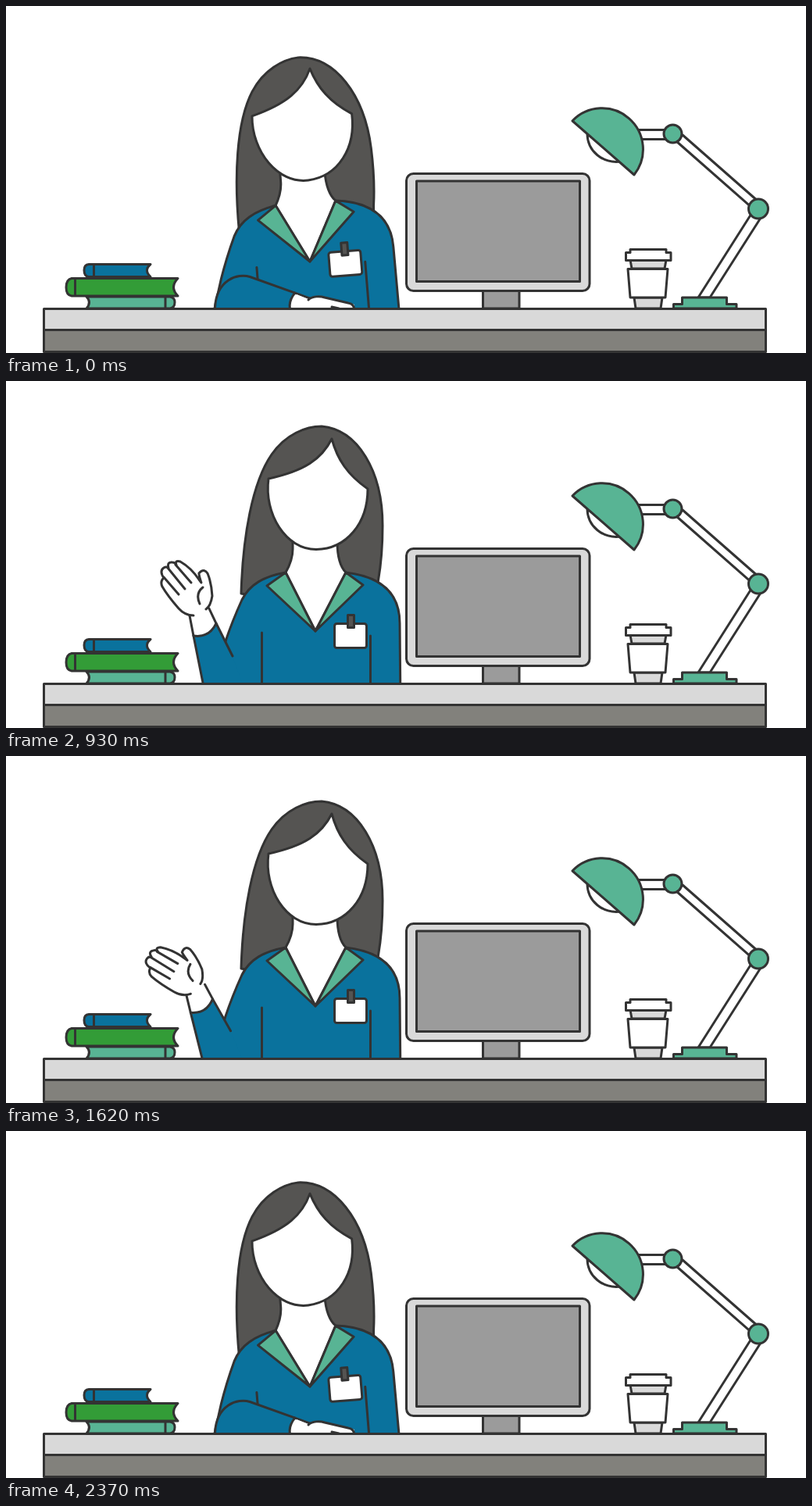
Write an HTML page that moves like this. It is 1024x444 px and loops after 3000 ms.

```html
<!DOCTYPE html>
<html lang="en">
<head>
<meta charset="utf-8">
<title>Reception desk</title>
<style>
  html, body { margin: 0; width: 100%; height: 100%; overflow: hidden; background: #fff; }
  svg { display: block; width: 100%; height: 100%; }
  g { stroke: #333; stroke-width: 3; stroke-linejoin: round; stroke-linecap: round; fill: none; }
  .white { fill: #fff; }
  .light { fill: #d9d9d9; }
  .gray { fill: #9b9b9b; }
  .dark { fill: #82817c; }
  .hair { fill: #555452; }
  .blue { fill: #0a729d; }
  .green { fill: #339c37; }
  .teal { fill: #58b494; }
  .bare { stroke: none; }
</style>
</head>
<body>
<svg viewBox="0 0 1024 444">
  <g id="hairBack">
    <path class="hair" d="M301,272 C303,200 315,130 340,94 C358,68 384,58 404,58 C450,62 482,115 482,185 Q482,225 476,258 L474,275 L400,290 Z"/>
  </g>

  <g id="torso">
    <path class="white bare" d="M367,200 V215 C367,228 362,238 358,245 L396,320 L435,245 C428,238 424,225 424,200 Z"/>
    <path d="M367,205 V215 C367,228 362,238 358,245 M424,205 C424,225 428,238 435,245"/>
    <path class="blue" d="M358,245 C330,250 312,260 302,280 C292,302 286,318 281,333 L254,420 H505 L504,310 C504,270 478,250 435,245 L396,320 Z"/>
    <path class="teal" d="M358,245 L334,262 L396,320 Z M435,245 L457,261 L396,320 Z"/>
    <path d="M327.5,322 V400 M466.5,326 V400"/>
    <rect class="white" x="420.5" y="310.5" width="41" height="31" rx="3"/>
    <rect class="hair" x="437.5" y="299.5" width="8" height="16"/>
  </g>

  <g id="face">
    <path class="white" d="M336,125 C330,170 358,215.5 397,215.5 C436,215 463,182 463,138 C437,120 424,100 417,74 C404,100 382,115 336,125 Z"/>
  </g>

  <g id="forearm">
    <path class="white bare" d="M240,326 L235,300 L259,291 L269,310 L262,332 Z"/>
    <path d="M240,326 L235,300 M269,310 L260,291"/>
    <path class="blue bare" d="M240,326 L252,386 C256,402 277,421 309,404 L290,352 L269,310 Q260,329 240,326 Z"/>
    <path d="M309,404 C277,421 256,402 252,386 L240,326 Q260,329 269,310 L290,352"/>
    <g id="openHand">
      <path class="white" d="M240,300 Q229,300 221,291 Q207,275 200,263 Q197,256 202,252 Q196,243 202,239 Q205,237 208,239 Q206,231 213,232 Q216,232 218,235 Q216,229 223,231 Q237,239 247,254 L250,258 Q247,249 247,246 Q253,239 258,246 Q263,258 264,275 Q262,288 256,292"/>
      <path d="M202,251 L221,273 M207,239 L229,266 M217,235 L237,258 M252,264 Q242,272 248,285"/>
    </g>
  </g>

  <g id="restHand">
    <path class="white bare" d="M372,369 L387,375 L408,373 L446,382 V394 H364 Z"/>
    <path class="white" d="M387,376 C392,371 402,371 408,373 L438,380 Q446,381 446,390"/>
    <path d="M417,385 L426,387"/>
  </g>

  <g id="desk">
    <rect class="light" x="48.5" y="387.5" width="924" height="27"/>
    <rect class="dark" x="48.5" y="414.5" width="924" height="28"/>
  </g>

  <g id="books">
    <path class="blue" d="M185,330.5 H106 Q100,331 100,338 Q100,346 106,346.5 H185 Q176,338 185,330.5 Z M112.5,331 V346"/>
    <path class="green" d="M220,348.5 H84 Q77,350 77,360 Q77,370 84,371 H220 Q209,360 220,348.5 Z M88.5,349 V371"/>
    <path class="teal" d="M103,372 H210 Q216,373 216,379 Q216,386 210,387 H103 Q110,379 103,372 Z M204,372 V386"/>
  </g>

  <g id="monitor">
    <rect class="gray" x="610.5" y="364" width="46.500" height="23"/>
    <rect class="light" x="512.5" y="214.500" width="234.500" height="150" rx="9"/>
    <rect class="gray" x="525.5" y="224" width="209" height="128.500"/>
  </g>

  <g id="cup">
    <path class="light" d="M799,325 H845 L843,336 H801 Z M804,373 H840 L838,387 H806 Z"/>
    <path class="white" d="M793.500,325.500 V315.500 H799 V311.500 H845 V315.500 H851 V325.500 Z M796,336.500 H847 L844,373 H799 Z"/>
  </g>

  <g id="lamp">
    <path class="white" d="M886,373 L954,266 L968,268 L901,373 Z M866,165 L964,251 L957,260 L858,173 Z M800,158.500 H850 V170.500 H800 Z"/>
    <path class="white" d="M744,163 C744,186 764,202 787,199 Z"/>
    <path class="teal" d="M725,147 A52.5,52.500 0 0 1 804,216 Z"/>
    <circle class="teal" cx="853.5" cy="163.500" r="11.500"/>
    <circle class="teal" cx="963" cy="259.500" r="12.500"/>
    <path class="teal" d="M854.500,387 V381.500 H865.500 V373 H922.500 V381.500 H935 V387 Z"/>
  </g>
</svg>
<script>
  const LOOP = 3000, STEP = 30;
  const ELBOW = { drawn: [265, 371], raised: [263.5, 372], rest: [318.4, 365.4] };
  const RAISED_ANGLE = -2.8, REST_ANGLE = 121;

  const clamp = x => Math.min(1, Math.max(0, x));
  const ease = x => x * x * (3 - 2 * x);
  const lerp = (a, b, k) => a + (b - a) * k;
  const part = id => document.getElementById(id);
  const place = (id, value) => part(id).setAttribute('transform', value);
  const show = (id, on) => part(id).setAttribute('visibility', on ? 'visible' : 'hidden');

  // 1 = arm resting on the desk, 0 = arm raised
  const restAmount = t => t < 2085
    ? 1 - ease(clamp((t - 270) / 300))
    : ease(clamp((t - 2070) / 300));

  // three waves of 300 ms each
  function waveAmount(t) {
    if (t < 720 || t > 1620) return 0;
    const phase = ((t - 720) % 300) / 150;
    return ease(phase < 1 ? phase : 2 - phase);
  }

  function pose(t) {
    const rest = restAmount(t), wave = waveAmount(t);

    const head = `translate(${-21 * rest} ${16 * rest}) rotate(${-7.2 * rest} 335 125)`;
    place('hairBack', head);
    place('face', head);
    place('torso', `translate(${-7 * rest} ${7 * rest}) rotate(${-4.6 * rest} 396 320)`);

    const x = lerp(ELBOW.raised[0], ELBOW.rest[0], rest) + 2.3 * wave;
    const y = lerp(ELBOW.raised[1], ELBOW.rest[1], rest) - 1.5 * wave;
    const angle = lerp(RAISED_ANGLE, REST_ANGLE, rest) + 4.3 * wave;
    const hinge = (turn, [px, py]) => `translate(${x} ${y}) rotate(${turn}) translate(${-px} ${-py})`;
    place('forearm', hinge(angle, ELBOW.drawn));
    place('restHand', hinge(angle - REST_ANGLE, ELBOW.rest));

    const bend = ease(clamp(2 * rest));
    place('openHand', `translate(${6 * bend} ${16 * bend}) rotate(${-16.2 + 25 * wave + 42 * bend} 248 297)`);
    show('openHand', rest < 0.87);
    show('restHand', rest >= 0.87);
  }

  const start = performance.now();
  function frame() {
    const t = (performance.now() - start) % LOOP;
    pose(Math.floor(t / STEP) * STEP);
    requestAnimationFrame(frame);
  }
  frame();
</script>
</body>
</html>
```
